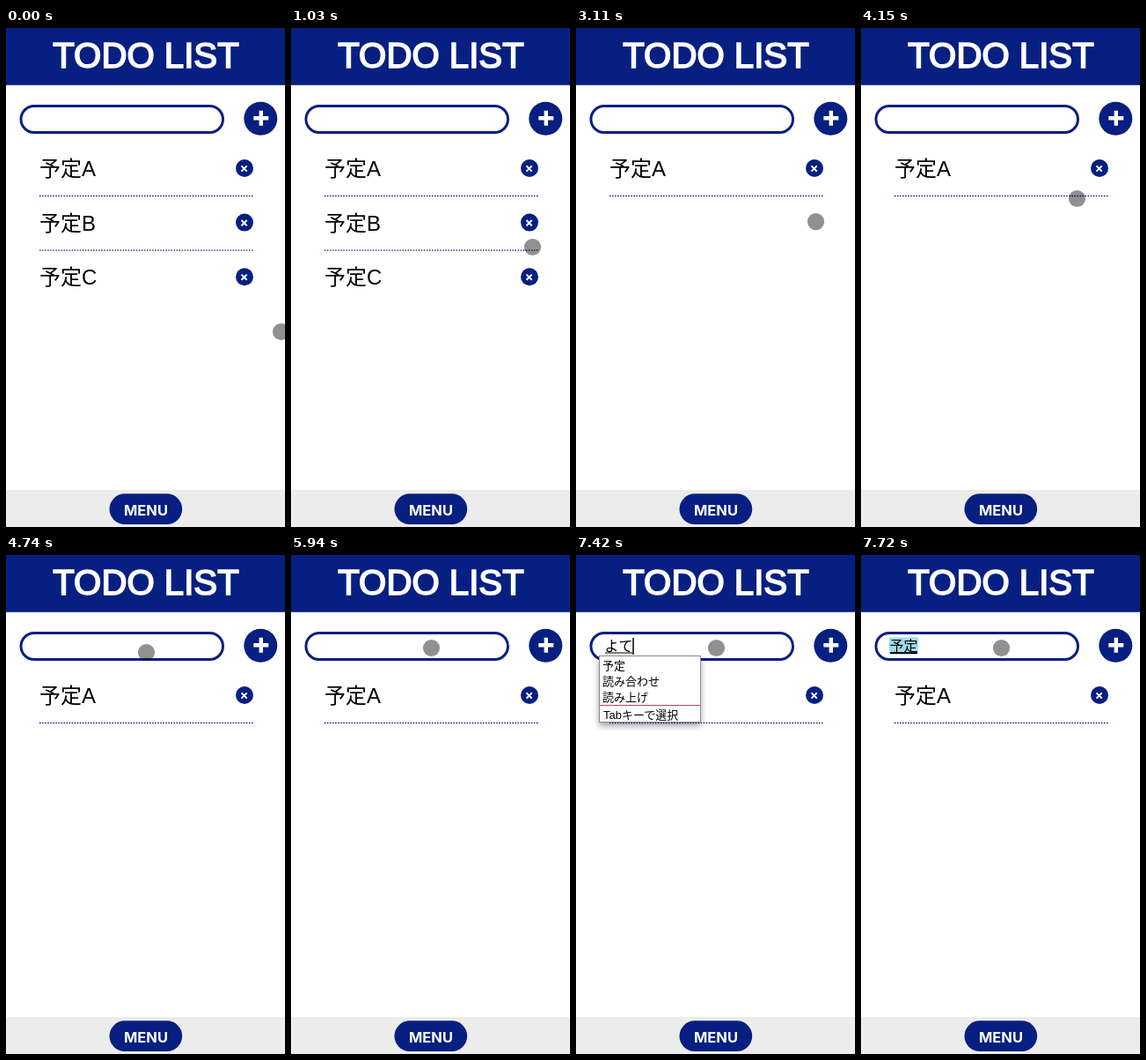
Recreate the animation shown at these times as an HTML page. Size 317 px wide and 566 px high, loop 8 s.

```html
<!DOCTYPE html>
<html lang="ja">
<head>
<meta charset="utf-8">
<style>
html, body { margin: 0; width: 100%; height: 100%; overflow: hidden; background: #fff; }
svg { display: block; width: 317px; height: 566px; font-family: "Liberation Sans", "Noto Sans CJK JP", sans-serif; }
.navy { fill: #071f80; }
.title { font-size: 40.2px; fill: #fff; stroke: #fff; stroke-width: 1.7px; }
.menu { font: bold 16.5px Inter, sans-serif; fill: #fff; }
.item { font-size: 24px; }
.typed { font-size: 16px; }
.popup { font-size: 13px; filter: drop-shadow(0 4px 3.5px rgba(0, 0, 0, .35)); }
.rule { stroke: #071f80; stroke-width: 1.3; stroke-dasharray: 1.5 1.55; }
</style>
</head>
<body>
<svg viewBox="0 0 317 566">
  <rect class="navy" width="317" height="64.8"/>
  <text class="title" x="159" y="45" text-anchor="middle">TODO LIST</text>

  <rect x="17" y="88.5" width="229.5" height="30" rx="15" fill="#fff" stroke="#071f80" stroke-width="3"/>
  <circle class="navy" cx="289.3" cy="102.8" r="19"/>
  <path d="M281.3 102.2h17M289.8 93.7v17" stroke="#fff" stroke-width="4.4"/>

  <g id="list"></g>

  <rect y="524" width="317" height="42" fill="#ececec"/>
  <rect class="navy" x="117.5" y="528.3" width="82.7" height="34.8" rx="17.4"/>
  <text class="menu" x="159" y="552.6" text-anchor="middle">MENU</text>

  <rect id="highlight" x="32" y="93.5" width="33" height="18" fill="#9fdcec"/>
  <text id="typed" class="typed" x="32.5" y="109"></text>
  <rect id="underline" x="33" fill="#000"/>
  <rect id="caret" y="94" width="1.5" height="19"/>

  <g id="popup" class="popup">
    <rect x="26.5" y="114.5" width="115" height="75" fill="#fff" stroke="#8c8c8c"/>
    <text x="30" y="130">予定</text>
    <text x="30" y="148">読み合わせ</text>
    <text x="30" y="166">読み上げ</text>
    <path d="M27 170.5h114" stroke="#b04a4a"/>
    <text x="31" y="186">Tabキーで選択</text>
  </g>

  <circle id="pointer" r="9.6" fill="#000" fill-opacity=".435"/>
</svg>
<script>
const DURATION = 8000, FRAMES = 54;
const $ = id => document.getElementById(id);

// Pointer path: frame, x, y
const path = [
  [0, 312.5, 344.5], [1, 310, 338], [3, 296, 306], [5, 281, 267], [7, 274.5, 248.5],
  [8, 273.5, 242.5], [9, 273, 234], [10, 272.5, 224], [11, 272.5, 219.6],
  [26, 272.5, 219.6], [27, 267, 214], [29, 224, 173], [31, 166, 120],
  [32, 159.5, 110.5], [33, 158.5, 107], [34, 159.5, 105.5], [FRAMES, 159.5, 105.5]
];

// Typed text, from frame
const typing = [[0, ""], [47, "よ"], [49, "よｔ"], [50, "よて"], [51, "よてい"], [52, "予定"]];

function pointerAt(frame) {
  const i = Math.max(1, path.findIndex(p => p[0] >= frame));
  const [f0, x0, y0] = path[i - 1], [f1, x1, y1] = path[i];
  const u = (frame - f0) / (f1 - f0);
  return [x0 + (x1 - x0) * u, y0 + (y1 - y0) * u];
}

function row(name, index, ruled) {
  return `<g transform="translate(0 ${index * 61.6})">
    <text class="item" x="38" y="168">予定${name}</text>
    <circle class="navy" cx="271" cy="159" r="10"/>
    <path d="M267.5 156.4l6.2 6.2m0 -6.2l-6.2 6.2" stroke="#fff" stroke-width="2"/>
    ${ruled ? '<path class="rule" d="M38 190.5H281"/>' : ""}</g>`;
}

const show = (id, visible) => $(id).setAttribute("visibility", visible ? "visible" : "hidden");

function set(id, attributes) {
  for (const name in attributes) $(id).setAttribute(name, attributes[name]);
}

let shownItems = "";
function draw(frame) {
  const items = frame < 15 ? "ABC" : frame < 21 ? "AC" : "A";
  if (items !== shownItems) {
    $("list").innerHTML = [...items].map((name, i) => row(name, i, name !== "C")).join("");
    shownItems = items;
  }

  const text = typing.filter(step => step[0] <= frame).pop()[1];
  const converted = frame >= 52, composing = frame >= 47 && !converted;
  const blink = frame >= 37 && frame < 40 || frame >= 44 && frame < 47;
  $("typed").textContent = text;
  set("underline", {
    width: Math.max(0, 16 * text.length - 1),
    y: converted ? 110.2 : 110.5,
    height: converted ? 2 : 1
  });
  set("caret", { x: 32.3 + 16 * text.length });
  show("caret", blink || composing);
  show("popup", composing);
  show("highlight", converted);

  const [cx, cy] = pointerAt(frame);
  set("pointer", { cx, cy });
}

function tick() {
  const time = performance.now() % DURATION;
  draw(Math.min(FRAMES - 1, Math.floor(time * FRAMES / DURATION + 0.1)));
  requestAnimationFrame(tick);
}
tick();
</script>
</body>
</html>
```
